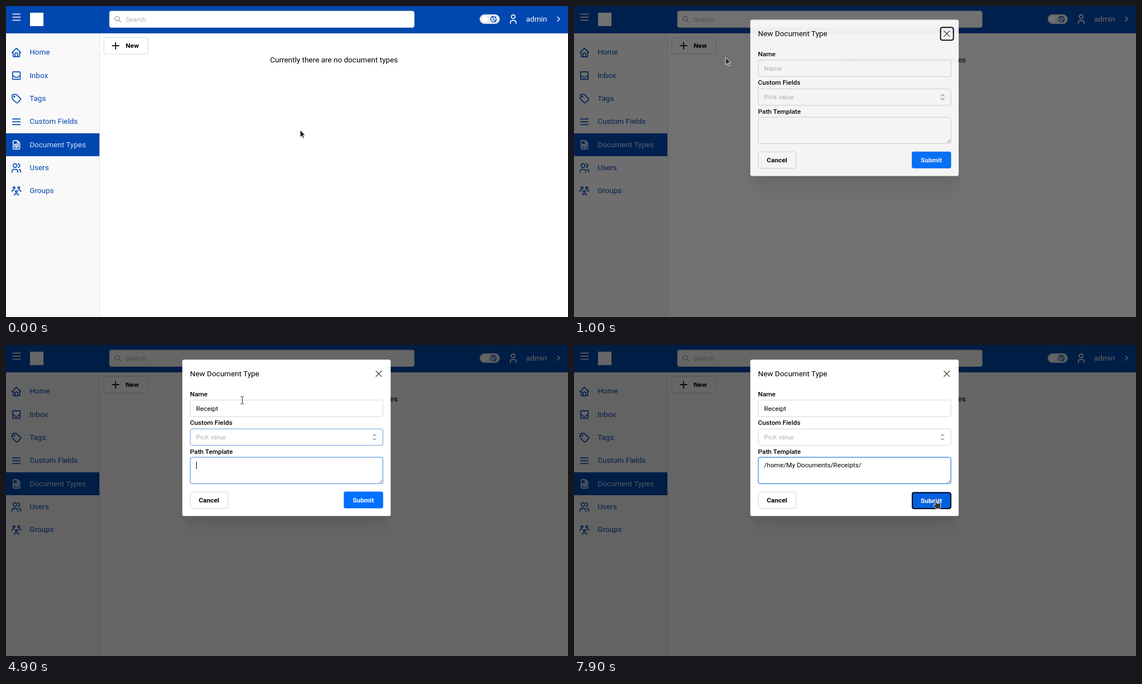
Animation, 1005 px wide and 557 px high, one loop 8 s. Source, as an HTML page:

```html
<!DOCTYPE html>
<html lang="en">
<head>
<meta charset="utf-8">
<title>New document type</title>
<style>
  html, body { margin: 0; width: 100%; height: 100%; overflow: hidden; background: #fff; }
  svg { display: block; width: 100vw; height: 100vh; }
  text { font-family: Roboto, sans-serif; font-size: 11.82px; white-space: pre; }
  .big { font-size: 13.5px; }
  .label { font-weight: 500; }
  .bold { font-weight: 600; }
  .mid { text-anchor: middle; }
  .hint { fill: #adb5bd; }
  .icon { fill: none; stroke-linecap: round; stroke-linejoin: round; }
  .box { fill: #fff; stroke: #ced4da; }
  .ring { fill: none; stroke: #0c70e6; }
</style>
</head>
<body>
<svg id="stage" viewBox="0 0 1005 557" preserveAspectRatio="none"></svg>
<script>
const LOOP = 8000, STEP = 100;
const BLUE = '#0048b0', SUBMIT = '#0070ff', SUBMIT_HOVER = '#0060df';

const ICONS = {
  home: 'M5 12H3l9-9 9 9h-2M5 12v7a2 2 0 0 0 2 2h10a2 2 0 0 0 2-2v-7M9 21v-6a2 2 0 0 1 2-2h2a2 2 0 0 1 2 2v6',
  inbox: 'M4 6a2 2 0 0 1 2-2h12a2 2 0 0 1 2 2v12a2 2 0 0 1-2 2H6a2 2 0 0 1-2-2zM4 13h3l3 3h4l3-3h3',
  tag: 'M6.5 7.5a1 1 0 1 0 2 0a1 1 0 1 0-2 0M3 6v5.172a2 2 0 0 0 .586 1.414l7.71 7.71a2.41 2.41 0 0 0 3.408 0l5.592-5.592a2.41 2.41 0 0 0 0-3.408l-7.71-7.71A2 2 0 0 0 11.172 3H6a3 3 0 0 0-3 3z',
  lines: 'M4 6h16M4 12h16M4 18h16',
  file: 'M14 3v4a1 1 0 0 0 1 1h4M17 21H7a2 2 0 0 1-2-2V5a2 2 0 0 1 2-2h7l5 5v11a2 2 0 0 1-2 2zM12 13.5l4-1.5M8 11.85l4 1.65V18l4-1.85v-4.3L12 10zM8 12v4.2l4 1.8',
  users: 'M5 7a4 4 0 1 0 8 0a4 4 0 1 0-8 0M3 21v-2a4 4 0 0 1 4-4h4a4 4 0 0 1 4 4v2M16 3.13a4 4 0 0 1 0 7.75M21 21v-2a4 4 0 0 0-3-3.85',
  group: 'M10 13a2 2 0 1 0 4 0a2 2 0 0 0-4 0M8 21v-1a2 2 0 0 1 2-2h4a2 2 0 0 1 2 2v1M15 5a2 2 0 1 0 4 0a2 2 0 0 0-4 0M17 10h2a2 2 0 0 1 2 2v1M5 5a2 2 0 1 0 4 0a2 2 0 0 0-4 0M3 13v-1a2 2 0 0 1 2-2h2',
  user: 'M8 7a4 4 0 1 0 8 0a4 4 0 0 0-8 0M6 21v-2a4 4 0 0 1 4-4h4a4 4 0 0 1 4 4v2',
  moon: 'M12 3h.393a7.5 7.5 0 0 0 7.92 12.446A9 9 0 1 1 12 2.992zM17 4a2 2 0 0 0 2 2a2 2 0 0 0-2 2a2 2 0 0 0-2-2a2 2 0 0 0 2-2M19 11h2m-1-1v2',
  plus: 'M12 5v14M5 12h14',
  search: 'M3 10a7 7 0 1 0 14 0a7 7 0 1 0-14 0M21 21l-6-6',
  cross: 'M6 6l12 12M18 6L6 18',
  selector: 'M8 9l4-4 4 4M16 15l-4 4-4-4',
  right: 'M9 6l6 6-6 6'
};

const icon = (name, cx, cy, color, scale = .844, width = 2) =>
  `<path class="icon" d="${ICONS[name]}" stroke="${color}" stroke-width="${width}"
    transform="translate(${cx} ${cy}) scale(${scale}) translate(-12 -12)"/>`;
const text = (x, y, str, cls = '', attrs = '') => `<text x="${x}" y="${y}" class="${cls}" ${attrs}>${str}</text>`;
const rect = (x, y, w, h, attrs = '', r = 3.4) =>
  `<rect x="${x}" y="${y}" width="${w}" height="${h}" rx="${r}" ${attrs}/>`;
const field = (id, y, h) =>
  rect(329.5, y, 344.5, h, 'class="box"') + rect(329.5, y, 344.5, h, `class="ring" id="${id}Ring"`);

const menu = [['home', 'Home'], ['inbox', 'Inbox'], ['tag', 'Tags'], ['lines', 'Custom Fields'],
  ['file', 'Document Types'], ['users', 'Users'], ['group', 'Groups']];

const sidebar = menu.map(([name, label], i) => {
  const y = 82.7 + i * 41.35, active = name === 'file';
  return (active ? rect(0, 228, 167, 41, `fill="${BLUE}"`, 0) : '') +
    icon(name, 18.6, y + .6, active ? '#e4eefc' : BLUE) +
    text(42.2, y + 4.6, label, 'big', `fill="${active ? '#cfe0fa' : BLUE}"`);
}).join('');

const header = rect(0, 0, 1005, 49, `fill="${BLUE}"`, 0) +
  '<path d="M11.5 14.5h14.5M11.5 20h14.5M11.5 25.5h14.5" stroke="#fff" stroke-width="1.7"/>' +
  rect(43, 12, 24, 24, 'fill="#fff"', 0) +
  rect(185, 9, 545, 29.5, 'class="box"') +
  icon('search', 200, 23.6, '#868e96', .56) +
  text(214, 28, 'Search', 'hint') +
  rect(847.5, 15.5, 35, 16, 'fill="#e9ecef" stroke="#dee2e6"', 8) +
  '<circle cx="856" cy="23.5" r="6.3" fill="#fff" stroke="#dee2e6" stroke-width=".8"/>' +
  icon('moon', 872, 23.5, BLUE, .56, 2.4) +
  icon('user', 907, 23.5, '#fff') +
  text(930, 28.2, 'admin', 'big', 'fill="#fff"') +
  icon('right', 988, 23.5, '#fff', .66);

const page = rect(0, 0, 1005, 557, 'fill="#fff"', 0) +
  rect(0, 49, 167, 508, 'fill="#f9f9f9"', 0) + rect(167, 49, 1, 508, 'fill="#dee2e6"', 0) +
  sidebar + header +
  rect(175, 56.5, 78.8, 29.5, 'id="newButton" class="box"') +
  icon('plus', 196, 71.2, '#000') + text(214, 75.3, 'New', 'bold') +
  text(586.5, 101, 'Currently there are no document types', 'big mid');

const modal =
  rect(321.5, 62, 361, 269, 'opacity=".05" filter="url(#softWide)"') +
  rect(321.5, 46, 361, 269, 'opacity=".05" filter="url(#soft)"') +
  rect(315.3, 26.3, 372.6, 280, 'fill="#fff"') +
  text(329, 56.1, 'New Document Type', 'big') +
  icon('cross', 666.6, 51.5, '#222', .84, 1.3) +
  rect(655.5, 40.2, 23, 23, 'id="closeRing" fill="none" stroke="#0a0a0a" stroke-width="2"') +
  text(329, 91.6, 'Name', 'label') + field('name', 98.6, 29.6) +
  text(329, 143.2, 'Custom Fields', 'label') + field('custom', 150.3, 29.4) +
  text(329, 194.8, 'Path Template', 'label') + field('path', 201.1, 47.2) +
  text(340, 117.7, 'Name', 'hint', 'id="nameHint"') + text(340, 117.7, '', '', 'id="nameText"') +
  text(340, 168.8, 'Pick value', 'hint') + icon('selector', 659, 165, '#868e96', .72, 1.7) +
  text(340, 219.4, '', '', 'id="pathText"') +
  '<path d="M667 247l6-6M670.5 247l2.5-2.5" stroke="#777" stroke-width=".9"/>' +
  rect(340, 107, 1, 13, 'id="caret"', 0) +
  rect(329.5, 263, 67.5, 29.5, 'class="box"') + text(363, 282.1, 'Cancel', 'bold mid') +
  '<g id="submit">' + rect(604, 262.6, 70.4, 30, `id="submitBox" fill="${SUBMIT}"`) +
  rect(605, 263.5, 68.8, 28.6, 'id="submitRing" fill="none" stroke="#000818" stroke-width="2"') +
  text(639, 282.1, 'Submit', 'bold mid', 'fill="#fff"') + '</g>';

const cursors =
  `<g id="cursor">
    <path id="arrow" d="M0 0V13.2L3 10.5 5.2 15.2 7.4 14.2 5.2 9.7H9.2Z" fill="#222" stroke="#fff" stroke-width=".9"/>
    <path id="beam" d="M-3-6.5h2.2l.8.8.8-.8H3M0-5.7V5.7M-3 6.5h2.2l.8-.8.8.8H3" fill="none" stroke="#222"/>
    <path id="hand" d="M-1.4 1.2a1.4 1.4 0 0 1 2.8 0V7l6 1.2q1.6.4 1.5 2l-.5 4q-.3 1.5-1 3H.3L-4 11.6q-.9-1.6.5-1.9 1 0 2.1 1.2z" fill="#333" stroke="#fff" stroke-width=".9"/>
  </g>`;

const stage = document.getElementById('stage');
stage.innerHTML = `<defs>
  <filter id="soft" x="-20%" y="-20%" width="140%" height="140%"><feGaussianBlur stdDeviation="7"/></filter>
  <filter id="softWide" x="-20%" y="-20%" width="140%" height="140%"><feGaussianBlur stdDeviation="12"/></filter>
  </defs>${page}${rect(0, 0, 1005, 557, 'id="shade"', 0)}<g id="modal">${modal}</g>${cursors}`;

const ui = Object.fromEntries([...stage.querySelectorAll('[id]')].map(el => [el.id, el]));
const set = (el, attrs) => Object.entries(attrs).forEach(([key, value]) => el.setAttribute(key, value));
const show = (el, on) => el.setAttribute('visibility', on ? 'inherit' : 'hidden');

// Tables of [time, value...]
const opening = [[0, 0], [900, .215], [1000, .925], [1100, 1]];
const nameTyping = [[0, ''], [2500, 'R'], [2700, 'Re'], [2900, 'Rece'], [3900, 'Recei'], [4300, 'Receipt']];
const pathTyping = [[0, ''], [5900, '/home/My Documents/Receipts/']];
const focus = {
  name: [[0, 0], [1600, .6], [1700, 1], [4600, .4], [4700, 0]],
  custom: [[0, 0], [4600, .6], [4700, 1], [4900, .5], [5000, 0]],
  path: [[0, 0], [4900, .7], [5000, 1]]
};
const caretOn = [[0, 0], [1600, 1], [2100, 0], [2500, 1], [3500, 0], [3900, 1], [4600, 0],
  [4900, 1], [5500, 0], [5900, 1], [6500, 0], [7000, 1], [7500, 0]];
const track = [[0, 526, 222], [100, 519, 218], [300, 415, 160], [500, 266, 84], [600, 240, 75],
  [800, 236, 73], [900, 249, 79], [1000, 271, 92], [1200, 338, 107], [1400, 400, 109],
  [1600, 420, 101], [1800, 422, 99], [1900, 422.5, 99], [6800, 422.5, 99], [6900, 426, 104],
  [7100, 480, 165], [7300, 580, 255], [7500, 638, 290], [7700, 646, 281], [7800, 647, 276]];

const at = (table, t) => table.findLast(row => row[0] <= t)[1];

function position(t) {
  const i = track.findLastIndex(row => row[0] <= t);
  const [t0, x0, y0] = track[i], [t1, x1, y1] = track[i + 1] || [LOOP, x0, y0];
  const k = (t - t0) / (t1 - t0);
  return [x0 + (x1 - x0) * k, y0 + (y1 - y0) * k];
}

function inside(x, y, left, top, right, bottom) {
  return x >= left && x <= right && y >= top && y <= bottom;
}

function drawCursor(t) {
  const [x, y] = position(t), opened = t >= 1100;
  const beam = opened && (inside(x, y, 329, 98, 674, 129) || inside(x, y, 329, 201, 674, 249));
  const hand = opened && inside(x, y, 604, 262, 675, 293);
  set(ui.cursor, { transform: `translate(${x} ${y})` });
  show(ui.beam, beam);
  show(ui.hand, hand);
  show(ui.arrow, !beam && !hand);
  ui.newButton.style.stroke = !opened && t < 1000 && inside(x, y, 175, 56, 254, 86) ? '#7f95e0' : '';
  set(ui.submitBox, { fill: hand ? SUBMIT_HOVER : SUBMIT });
}

function drawFields(t) {
  const name = at(nameTyping, t), path = at(pathTyping, t), inPath = t >= 4900;
  ui.nameText.textContent = name;
  ui.pathText.textContent = path;
  show(ui.nameHint, !name);
  for (const key in focus) set(ui[key + 'Ring'], { opacity: at(focus[key], t) });
  const typed = inPath ? ui.pathText : ui.nameText;
  const width = typed.textContent ? typed.getComputedTextLength() : 0;
  set(ui.caret, { x: Math.floor(340 + width), y: inPath ? 209 : 107 });
  show(ui.caret, at(caretOn, t));
}

function draw(t) {
  const open = at(opening, t), pressed = t >= 7900;
  set(ui.shade, { opacity: .6 * open });
  set(ui.modal, { opacity: open, transform: `translate(0 ${-25.3 * (1 - open)})` });
  show(ui.closeRing, t < 1600);
  set(ui.submit, { transform: `translate(0 ${pressed ? .9 : 0})` });
  show(ui.submitRing, pressed);
  drawFields(t);
  drawCursor(t);
}

const start = performance.now();
function tick() {
  const t = (performance.now() - start) % LOOP;
  draw(Math.floor(t / STEP) * STEP);
  requestAnimationFrame(tick);
}
tick();
</script>
</body>
</html>
```
